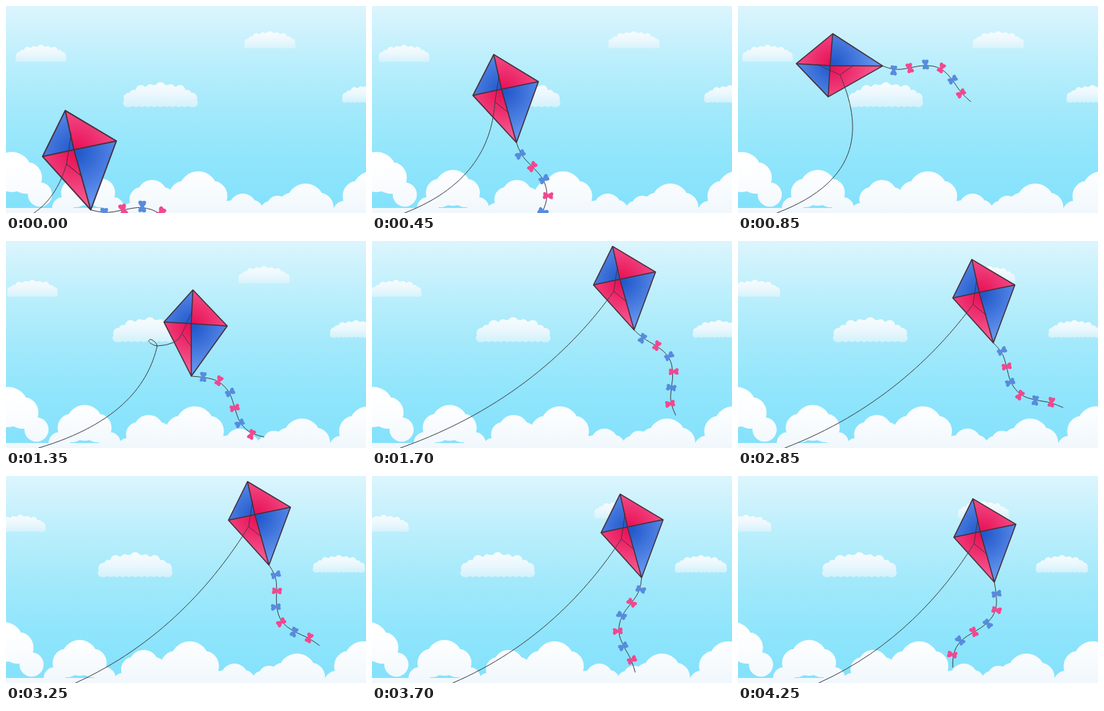
Recreate the animation shown at these times as an HTML page with a canvas. Size 500 px wide and 288 px high, loop 4350 ms.

```html
<!DOCTYPE html>
<html lang="en">
<head>
<meta charset="utf-8">
<title>Kite in the clouds</title>
<style>
  html, body { margin: 0; width: 100%; height: 100%; overflow: hidden; background: #b0ecfb; }
  canvas { display: block; width: 100vw; height: 100vh; }
</style>
</head>
<body>
<canvas id="stage" width="500" height="288"></canvas>
<script>
const W = 500, H = 288, LOOP = 4350, STEP = 50, LAST = 4250;
const ctx = document.getElementById('stage').getContext('2d');
const RAD = Math.PI / 180, TAU = 2 * Math.PI;
const PINK = '#f3478f', BLUE = '#578bdd', INK = '#45303c', THREAD = '#3f3f4a';
const HOVER_START = 1600;

const mix = (a, b, k) => a + (b - a) * k;
const clamp = v => Math.max(0, Math.min(1, v));
const bump = (t, mid, width) => Math.exp(-(((t - mid) / width) ** 2));
const smooth = (from, to, t) => {
  const s = clamp((t - from) / (to - from));
  return s * s * (3 - 2 * s);
};

// Smooth curve through rows of [time, ...values]
function spline(keys, t) {
  const last = keys.length - 1;
  let i = 0;
  while (i < last - 1 && keys[i + 1][0] <= t) i++;
  const a = keys[i], b = keys[i + 1], d = b[0] - a[0], s = (t - a[0]) / d;
  const slope = (j, c) => {
    const p = keys[Math.max(j - 1, 0)], n = keys[Math.min(j + 1, last)];
    return (n[c] - p[c]) / (n[0] - p[0]);
  };
  return a.slice(1).map((v, k) => {
    const c = k + 1;
    return mix(v, b[c], s * s * (3 - 2 * s))
      + d * s * (1 - s) * (slope(i, c) * (1 - s) - slope(i + 1, c) * s);
  });
}

// Swaying in place, lifted by two gusts
const hover = t => [
  347.4 + 10.2 * Math.cos(TAU * (t - 2100) / 1520),
  80 - 28 * bump(t, 1600, 260) - 24 * bump(t, 3280, 365)
];

// Climb and loop: time, x, y
const flight = [
  [0, 97, 203], [480, 186, 112], [680, 177, 54], [850, 131, 81.5],
  [1000, 108, 133], [1150, 152, 182], [1350, 258.7, 118],
  ...[HOVER_START, HOVER_START + 200].map(t => [t, ...hover(t)])
];

// Tail: time, mean heading, wave phase
const tailSway = [
  [0, 22, 190], [500, 80, 190], [850, 22, 180], [1350, -320, -100],
  [2100, -223, -180], [2850, -317, -360], [3700, -266, -360], [4250, -244, -460]
];

// x, top, width, speed
const smallClouds = [
  [48.5, 54, 73, -.0088],
  [366.5, 35, 74, -.006],
  [214.5, 106, 107, -.0108],
  [503, 110, 75, -.0125]
];

// x, y, radius
const bank = [
  [8, 231, 28], [114, 253, 25], [203, 263, 21], [267, 257, 27],
  [329, 280, 19], [377, 279, 15], [416, 273, 26], [508, 257, 27]
];

function circle(x, y, r) {
  ctx.moveTo(x + r, y);
  ctx.arc(x, y, r, 0, TAU);
}

function gradient(y0, y1, ...colors) {
  const g = ctx.createLinearGradient(0, y0, 0, y1);
  colors.forEach((c, i) => g.addColorStop(i / (colors.length - 1), c));
  return g;
}

const sky = gradient(0, H, '#dcf5fd', '#bdeffc', '#a3e9fb', '#8fe5fc', '#83e1fb');

// A dome with a bumpy rim
function drawSmallCloud([x, top, w, speed], t) {
  const cx = x + speed * t, base = top + .27 * w;
  ctx.fillStyle = gradient(top, top + .33 * w,
    '#f8fcfe', 'rgba(238,248,253,.95)', 'rgba(220,243,251,.8)');
  ctx.beginPath();
  ctx.ellipse(cx, base, .43 * w, .24 * w, 0, Math.PI, TAU);
  for (let i = 0; i <= 10; i++) {
    const a = Math.PI * i / 10, r = (.055 + .015 * (i % 2)) * w;
    circle(cx - .43 * w * Math.cos(a), base - .2 * w * Math.sin(a), r);
    circle(cx + (i - 5) * .08 * w, base, .055 * w);
  }
  ctx.fill();
}

function drawBank(t) {
  ctx.fillStyle = gradient(215, H, '#ffffff', '#f9fcfe', '#f0f7fc');
  ctx.beginPath();
  for (const [x, y, r] of bank) {
    for (let k = -2; k <= 2; k++) {
      circle(x - .0036 * t + .7 * r * k, y + .28 * r * k * k, r * (1 - .2 * Math.abs(k)));
    }
  }
  ctx.rect(0, 281, W, 7);
  ctx.fill();
}

function drawString(t, meet) {
  const slack = 80 * bump(t, 900, 500);
  const end = 38 + .2 * slack + 74 * smooth(2300, 3650, t);
  const k = clamp(Math.min((t - 1000) / 300, (1600 - t) / 250));
  const x = mix(meet.x, 210, k), y = mix(meet.y, 146, k);
  ctx.beginPath();
  ctx.moveTo(meet.x, meet.y);
  if (k > 0) {
    // small curl where the string crosses itself
    ctx.quadraticCurveTo(x + 28 * k, y - k, x, y);
    ctx.bezierCurveTo(x - 8 * k, y - k, x - 16 * k, y - 8 * k, x - 9 * k, y - 9 * k);
    ctx.quadraticCurveTo(x - 2 * k, y - 7 * k, x, y);
  }
  ctx.bezierCurveTo(
    mix(x, end, .2) + .6 * slack, mix(y, H, .36),
    mix(x, end, .52) + slack, mix(y, H, .76), end, H);
  ctx.stroke();
}

function drawBow({ x, y }, turn, color, scale) {
  ctx.save();
  ctx.translate(x, y);
  ctx.rotate(turn);
  ctx.scale(scale, scale);
  ctx.fillStyle = color;
  ctx.beginPath();
  for (const s of [-1, 1]) {
    ctx.moveTo(0, -2 * s);
    ctx.bezierCurveTo(2 * s, -3.5 * s, 4 * s, -6 * s, 6.5 * s, -4 * s);
    ctx.quadraticCurveTo(7.5 * s, -1.5 * s, 6 * s, 0);
    ctx.quadraticCurveTo(7.5 * s, 2 * s, 6 * s, 4.2 * s);
    ctx.quadraticCurveTo(3 * s, 5 * s, 0, 2 * s);
  }
  ctx.rect(-2, -2, 4, 4);
  ctx.fill();
  ctx.restore();
}

function drawTail(t, start, scale) {
  const [heading, phase] = spline(tailSway, t);
  const angle = i => (heading + 37 * Math.sin((55 * i + phase) * RAD)) * RAD;
  const pts = [start];
  for (let i = 0; i < 7; i++) {
    const length = (i === 0 ? 16.5 : i === 6 ? 18 : 22.5) * scale;
    pts.push({
      x: pts[i].x + Math.cos(angle(i)) * length,
      y: pts[i].y + Math.sin(angle(i)) * length
    });
  }
  ctx.beginPath();
  ctx.moveTo(start.x, start.y);
  for (let i = 1; i < 7; i++) {
    const a = pts[i], b = pts[i + 1], h = i < 6 ? .5 : 1;
    ctx.quadraticCurveTo(a.x, a.y, mix(a.x, b.x, h), mix(a.y, b.y, h));
  }
  ctx.stroke();
  for (let i = 1; i < 7; i++) {
    drawBow(pts[i], angle(i - .5) + Math.PI / 2, i % 2 ? BLUE : PINK, scale);
  }
}

function shade(inner, outer) {
  const g = ctx.createRadialGradient(0, 0, 4, 0, 0, 60);
  g.addColorStop(0, inner);
  g.addColorStop(1, outer);
  return g;
}

function drawKite({ x, y, turn, scale, lean }) {
  const nose = [0, -50], tail = [0, 70], left = [-39 - lean, -4.5], right = [49 - lean, -.6];
  const mid = [-1.5, -3];
  const blue = shade('#2259cb', '#6394ee'), pink = shade('#e81257', '#f65a92');
  const rod = (a, b) => {
    ctx.moveTo(...a);
    ctx.quadraticCurveTo(2 * mid[0] - (a[0] + b[0]) / 2, 2 * mid[1] - (a[1] + b[1]) / 2, ...b);
  };
  ctx.save();
  ctx.translate(x, y);
  ctx.rotate(turn);
  ctx.scale(scale, scale);
  ctx.lineJoin = 'round';
  for (const [a, b, fill] of [[nose, left, blue], [nose, right, pink], [tail, left, pink], [tail, right, blue]]) {
    ctx.fillStyle = fill;
    ctx.beginPath();
    for (const p of [mid, a, b]) ctx.lineTo(...p);
    ctx.fill();
  }
  ctx.strokeStyle = INK;
  ctx.lineWidth = 1.5;
  ctx.beginPath();
  for (const p of [nose, right, tail, left]) ctx.lineTo(...p);
  ctx.closePath();
  ctx.moveTo(...nose);
  ctx.lineTo(...mid);
  ctx.lineTo(...tail);
  rod(left, right);
  ctx.stroke();
  // bridle
  ctx.lineWidth = .8;
  ctx.beginPath();
  for (const p of [[0, -22], [-14, 11], [0, 30]]) ctx.lineTo(...p);
  ctx.stroke();
  ctx.restore();
}

function kiteAt(t) {
  const [x, y] = t < HOVER_START ? spline(flight, t) : hover(t);
  return {
    x, y,
    turn: (-14.4 - 360 * smooth(600, 1457, t)) * RAD,
    scale: 1.19 - .19 * smooth(0, 700, t),
    lean: 6 * bump(t, 850, 300)
  };
}

function draw(t) {
  const kite = kiteAt(t);
  const c = Math.cos(kite.turn) * kite.scale, s = Math.sin(kite.turn) * kite.scale;
  const onKite = (u, v) => ({ x: kite.x + u * c - v * s, y: kite.y + u * s + v * c });

  ctx.fillStyle = sky;
  ctx.fillRect(0, 0, W, H);
  smallClouds.forEach(cloud => drawSmallCloud(cloud, t));
  drawBank(t);

  ctx.strokeStyle = THREAD;
  ctx.lineWidth = 1;
  drawTail(t, onKite(0, 70), kite.scale);
  drawKite(kite);
  drawString(t, onKite(-14, 11));
}

function frame() {
  const t = performance.now() % LOOP;
  draw(Math.min(LAST, Math.floor(t / STEP) * STEP));
  requestAnimationFrame(frame);
}
frame();
</script>
</body>
</html>
```
